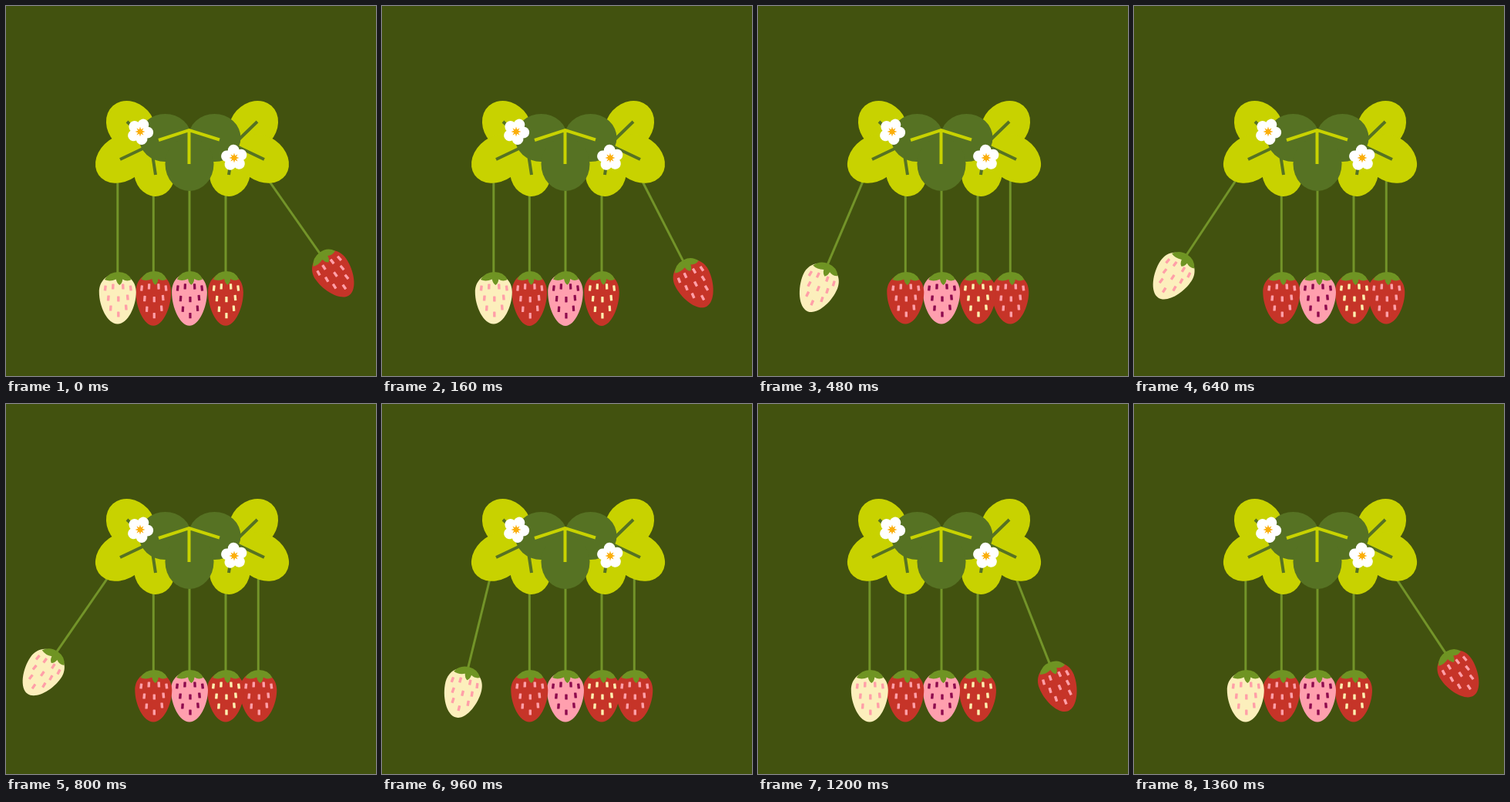
An HTML page for the animation above (1440 ms loop, 480 by 480 pixels).

```html
<!DOCTYPE html>
<html lang="en">
<head>
<meta charset="utf-8">
<title>Strawberry cradle</title>
<style>
  html, body { margin: 0; width: 100%; height: 100%; overflow: hidden; background: #42520f; }
  svg { display: block; width: 100vw; height: 100vh; }
</style>
</head>
<body>
<svg id="stage" viewBox="0 0 480 480">
  <defs>
    <path id="body" d="M0 2C14 1 24 11 24 25C24 44 13 66.5 0 66.5S-24 44 -24 25C-24 11 -14 1 0 2Z"/>
    <path id="crown" fill="#6f9423" d="M-17 9Q-11 -1 1 -1Q13 -1 18 9Q12 12 6.5 8.5Q6 14 2.5 16Q-1 14 -2 8.5Q-10 12 -17 9Z"/>
    <g id="sideLeaf">
      <g fill="#c8d200">
        <ellipse cx="162" cy="155.6" rx="35" ry="29.5" transform="rotate(48 162 155.6)"/>
        <ellipse cx="150.5" cy="198" rx="37" ry="29" transform="rotate(-35 150.5 198)"/>
        <ellipse cx="192.5" cy="216" rx="26.5" ry="31" transform="rotate(-10 192.5 216)"/>
        <path d="M165 165H205V215H165Z"/>
      </g>
      <path d="M157 150L188 180L148 199M188 180L194 219" fill="none" stroke="#567223" stroke-width="4"/>
    </g>
  </defs>
  <rect width="480" height="480" fill="#42520f"/>
  <g id="berries"></g>
  <use href="#sideLeaf"/>
  <use href="#sideLeaf" transform="translate(483) scale(-1 1)"/>
  <g fill="#567223">
    <ellipse cx="206.5" cy="171" rx="34" ry="31"/>
    <ellipse cx="270.5" cy="171" rx="34" ry="31"/>
    <ellipse cx="238" cy="205" rx="31.5" ry="35"/>
  </g>
  <path d="M198 174L237.5 161L277 173.5M237.5 160V205" fill="none" stroke="#c8d200" stroke-width="4"/>
  <g id="flowers"></g>
</svg>
<script>
const LOOP = 1440, STEP = 80, PIVOT_Y = 207, CROWN_Y = 346;
const SWING = 35.1, POWER = 2.36, FALL = 247;
const LEFT = { launch: 320, rise: 440 }, RIGHT = { launch: 1068, rise: 400 };

const kinds = [
  { x: 144.8, skin: '#fcefbc', seed: '#ff9fa8' },
  { x: 191.3, skin: '#c63428', seed: '#ff9fa8' },
  { x: 238, skin: '#ff9fae', seed: '#8e0b4e' },
  { x: 285, skin: '#c63428', seed: '#fff0b0' },
  { x: 327.3, skin: '#c63428', seed: '#ff9fa8' }
];
const seeds = [[-16, 20], [-6, 18], [7, 18], [17, 20], [-12, 33], [1, 34], [13, 32], [-9, 46], [11, 45], [1, 54]];

const seedMarks = seeds.map(([x, y]) =>
  `<rect x="${x - 1.7}" y="${y - 3.5}" width="3.4" height="7" rx=".5" transform="rotate(${-x * 0.4} ${x} ${y})"/>`).join('');

const berryMarkup = ({ x, skin, seed }) => `<g>
  <path d="M${x} ${PIVOT_Y}V${CROWN_Y + 3}" stroke="#739429" stroke-width="3"/>
  <g><use href="#body" fill="${skin}"/><g fill="${seed}">${seedMarks}</g><use href="#crown"/></g></g>`;

function flowerMarkup(x, y, turn) {
  let petals = '', star = '';
  for (let i = 0; i < 5; i++) petals += `<circle cx="9.8" r="7.4" transform="rotate(${turn + i * 72})"/>`;
  for (let i = 0; i < 16; i++) {
    const a = i * Math.PI / 8, r = i % 2 ? 3 : 6.5;
    star += `${r * Math.cos(a)},${r * Math.sin(a)} `;
  }
  return `<g transform="translate(${x} ${y})" fill="#fff">${petals}<circle r="7"/><polygon points="${star}" fill="#fbae0a"/></g>`;
}

const berries = document.getElementById('berries');
berries.innerHTML = [...kinds].reverse().map(berryMarkup).join('');
const nodes = [...berries.children].reverse();
document.getElementById('flowers').innerHTML = flowerMarkup(174, 163, 78) + flowerMarkup(296, 197, -95);

const since = (t, start) => (t - start + LOOP) % LOOP;
const pulse = (x, length) => x < length ? Math.sin(Math.PI * x / length) : 0;

// Outward angle: quick rise, accelerating fall, then a small push inward
function swing(t, { launch, rise }) {
  const x = since(t, launch);
  if (x < rise) return SWING * (1 - (1 - x / rise) ** POWER);
  if (x < rise + FALL) return SWING * (1 - ((x - rise) / FALL) ** POWER);
  return -1.3 * pulse(x - rise - FALL, 120);
}

const impact = (t, { launch, rise }) => pulse(since(t, launch + rise + FALL), 200) ** 2;

function draw(t) {
  const squeeze = 0.055 * Math.max(impact(t, LEFT), impact(t, RIGHT));
  const angles = [swing(t, LEFT), 0, 0, 0, -swing(t, RIGHT)];
  nodes.forEach((node, i) => {
    const { x } = kinds[i], s = i % 4 ? squeeze : 0;
    node.setAttribute('transform', `rotate(${angles[i]} ${x} ${PIVOT_Y})`);
    node.lastElementChild.setAttribute('transform', `translate(${x} ${CROWN_Y - 20 * s}) scale(${1 - s} ${1 + s})`);
  });
}

const begin = performance.now();
function tick() {
  const t = (performance.now() - begin) % LOOP;
  draw(Math.floor(t / STEP) * STEP);
  requestAnimationFrame(tick);
}
tick();
</script>
</body>
</html>
```
